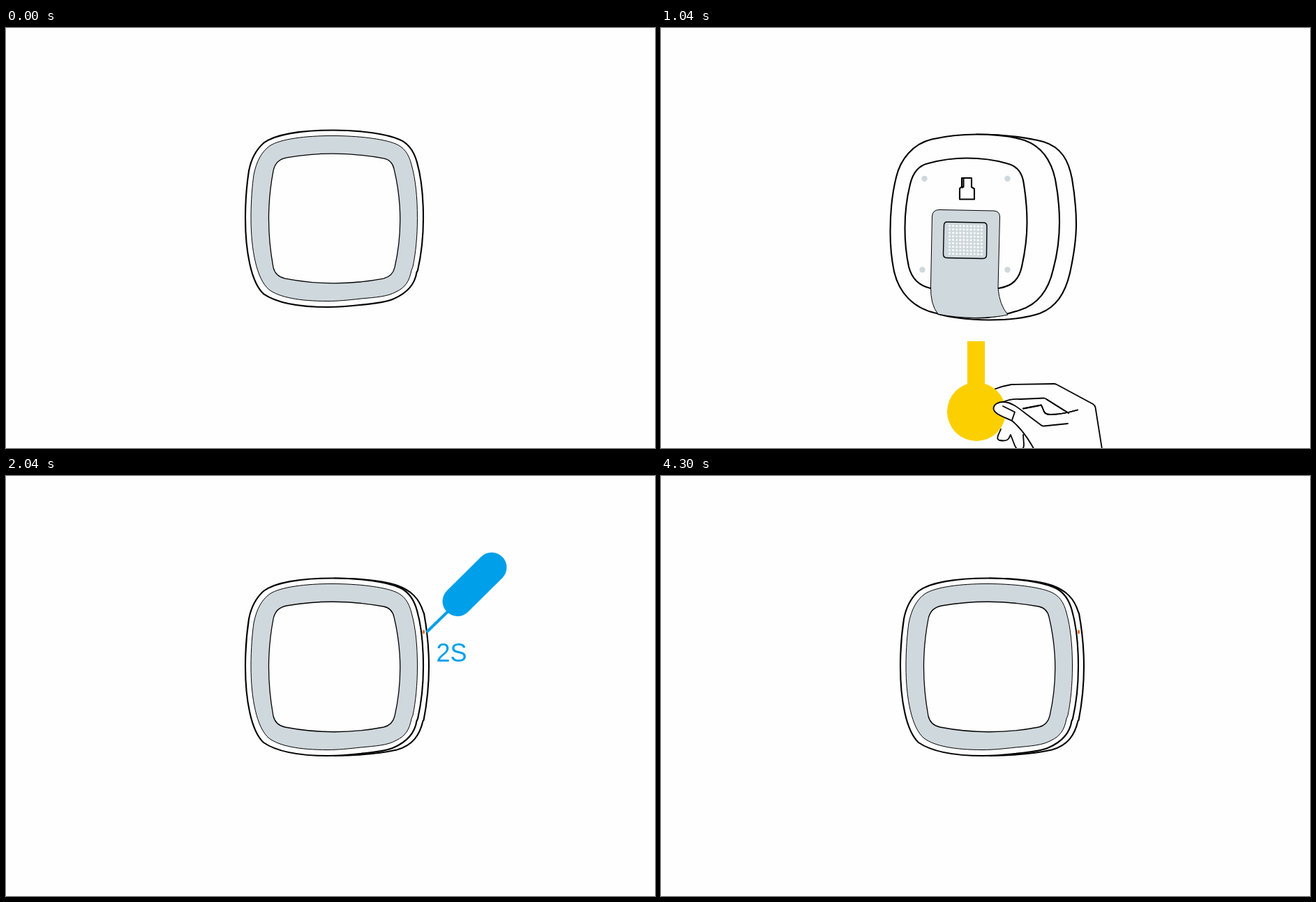
Recreate the animation shown at these times as an HTML page. Size 930 px wide and 602 px high, loop 4700 ms.

```html
<!DOCTYPE html>
<html lang="en">
<head>
<meta charset="utf-8">
<title>Device setup</title>
<style>
  html, body { margin: 0; width: 100%; height: 100%; overflow: hidden; background: #fefefe; }
  svg { display: block; width: 930px; height: 602px; }
  .line { fill: none; stroke: #000; stroke-width: 1.8; stroke-linecap: round; stroke-linejoin: round; }
  .body { fill: #fefefe; stroke: #000; stroke-width: 2.1; stroke-linejoin: round; }
  .grey { fill: #cfd8dd; }
  .thin { stroke: #000; stroke-width: 1; }
  .yellow { fill: #fcd000; }
  .blue { fill: #009fe9; }
  text { font: 36px "Liberation Sans", Arial, sans-serif; }
</style>
</head>
<body>
<svg viewBox="0 0 930 602">
  <defs>
    <radialGradient id="glow">
      <stop offset=".7" stop-color="#66dd1a"/>
      <stop offset="1" stop-color="#66dd1a" stop-opacity="0"/>
    </radialGradient>
  </defs>

  <g id="front">
    <g id="side">
      <path class="body" d="M470 146.5C510 147 544 151 561 157C580 164 592 175 598 195L599 197C603 219 606 243 606 273C606 302 603 327 598.5 350L597.5 351C593 371 583 386 560 392.5C535 398 506 400.500 470 401"/>
    </g>
    <path class="body" d="M343 273C343 240 346 218 348 205C351 189 358 175 369 165C386 152 425 146.500 469 146.500C510 146.500 546 152 564 160L568 162C578 168 585 178 589 193C595 214 598 240 598 273C598 301 595 326 590 348L588.500 351C586 368 574 381 556 389C545 394 530 396 507 398C490 400 476 401 461 401C415 401 385 393 369 382C351 365 343 320 343 273Z"/>
    <path class="grey thin" d="M351 273C351 247 353 225 355 211C359 190 367 177 378 169C393 159 430 154.500 467 154.500C505 154.500 541 159 558 166C570 171 577 180 581 196C587 217 589.500 243 589.500 273C589.500 299 587 324 583 343L581 348C578 364 572 373 559 379C547 386 530 387 508 389C490 391 476 392.500 461 392.500C420 392.500 392 387 377 376C359 361 351 318 351 273Z"/>
    <path class="body" style="stroke-width:1.3" d="M383 205Q386 189 402 186Q470 174 541 187Q553 189 556 202Q573 273 557 344Q554 357 541 360Q470 373.500 400 360Q386 357 383 344Q370 273 383 205Z"/>
    <ellipse id="button" cx="598.500" cy="223.500" rx="1.700" ry="3" fill="#e8742a"/>
    <g id="tool" stroke="#009fe9">
      <path d="M602.500 224L637 190.500" stroke-width="4"/>
      <path d="M696 131L647 179.500" stroke-width="43" stroke-linecap="round"/>
    </g>
    <text id="count" class="blue" x="616.500" y="266"></text>
    <circle id="light" cx="466.500" cy="381" r="9" fill="url(#glow)"/>
  </g>

  <g id="back">
    <rect width="930" height="602" fill="#fefefe"/>
    <g id="hand">
      <path class="line" d="M477 434Q490 429 502 427L563 426Q565 426 567 427L619 455Q622 457 622.500 460L640 570L652 645
        M490 452Q502 447 515 448L549 446.500Q551 447 553 448.500L584 468
        M519 461.500L545 456.500L549 466Q551 470 558 470Q574 470 597 463.500
        M487 491L483 500Q481 506 485 507Q497 509 499 503L501 499L506 512Q509 521 515 521Q520 520 520 513L519 499"/>
      <path class="yellow" d="M439 365h25v65h-25z"/>
      <circle class="yellow" cx="452" cy="466" r="42"/>
      <path fill="#fefefe" d="M490 452C502 452 513 461 523 469L546 486L583 483L594 580C569 577 557 565 545 538C530 511 520 493 503 479C493 474 476 469 476.500 461C477 455 484 452 490 452Z"/>
      <path class="line" d="M583 483L549 486.500Q546 487 543 484L523 469C513 461 502 452 490 452C484 452 477 455 476.500 461C476 469 493 474 503 479C520 493 530 511 545 538C555 566 570 579 594 580.500
        M545 538C544 570 544 573 552 580L574 603L600 632
        M490 458L507 466.500L503 478
        M519 461.500L545 456.500L549 466Q551 470 558 470Q574 470 597 463.500M553 448.500L584 468"/>
    </g>
    <path class="body" d="M452 152.500C490 152.500 525 157 548 163C574 171 584 190 589 216C593 240 595 260 595 281C595 304 591 328 586 351C579 381 566 400 543 409C520 417 495 418.500 470 418.500C440 418 415 415 397 410Z"/>
    <path class="body" d="M328.500 292C328.500 265 331 238 337 214C343 188 361 166 388 159.500C410 154.500 430 152.500 452 152.500C478 152.500 502 155 521 161C546 170 559 189 565 217C569 238 571 258 571 278C571 300 568 324 562 346C555 377 540 396 515 404C495 411 475 415.500 455 415.500C430 415 412 413 395 409C361 402 341 379 334 349C330 330 328.500 311 328.500 292Z"/>
    <path class="body" d="M349.500 287C349.500 265 353 240 357 224C361 207 369 197 383 194C401 189 420 186.500 438 186.500C458 186.500 478 189 495 194C512 198 518 209 520 224C523 243 524.500 260 524.500 279C524.500 302 521 324 517 342C513 360 504 370 484 373H386C368 369 359 358 355 342C351 323 349.500 305 349.500 287Z"/>
    <g class="grey">
      <circle cx="377.500" cy="216" r="4.200"/><circle cx="496.500" cy="216" r="4.200"/>
      <circle cx="374.500" cy="346.500" r="4.200"/><circle cx="496.500" cy="346.500" r="4.200"/>
    </g>
    <path class="body" d="M431 215H445V228L449 230.500V245.500H428V230L431 227.500ZM433.500 215V227.500L431 229"/>
    <path class="grey thin" d="M388.500 270Q389 260.500 399 260.500L476 262Q485.500 262 485.500 271L483 373Q485 397 497 411Q480 415 450 415.500Q420 415 397 410Q386 397 386.500 370Z"/>
    <path class="grey thin" style="stroke-width:1.400" d="M405.500 283Q405.500 278 410 278L462 279Q467 279 467 284L466.500 325Q466.500 330.500 461 330.500L410 329.500Q404.500 329.500 404.500 324Z"/>
    <g id="grid" fill="#fefefe"></g>
  </g>
</svg>
<script>
const LOOP = 4700;
const el = id => document.getElementById(id);
const [side, button, tool, count, light, front, back, hand, grid] =
  ['side', 'button', 'tool', 'count', 'light', 'front', 'back', 'hand', 'grid'].map(el);

for (let row = 0; row < 9; row++) {
  for (let col = 0; col < 10; col++) {
    const dot = document.createElementNS('http://www.w3.org/2000/svg', 'circle');
    dot.setAttribute('cx', 413.5 + col * 5.1);
    dot.setAttribute('cy', 283.5 + row * 5 + col * 0.08);
    dot.setAttribute('r', 1.5);
    grid.append(dot);
  }
}

// Number of discrete steps done, from 0 to n; the first falls on "from", the last on "to".
function steps(t, from, to, n) {
  const k = Math.floor((t - from) / (to - from) * (n - 1) + 1e-6) + 1;
  return Math.max(0, Math.min(n, k));
}
const show = (node, opacity) => { node.style.opacity = opacity; };

function draw(t) {
  const second = t >= 1380;
  const pulled = Math.max(0, steps(t, 530, 1040, 18) - 1) / 17;
  const away = 24 * (1 - steps(t, 1820, 2040, 8) / 8);

  show(front, second ? steps(t, 1520, 1790, 10) / 10 : t < 300 ? 1 : 0);
  front.setAttribute('transform', second ? '' : 'matrix(1 0 0 .996 0 .58)');
  show(side, second ? 1 : 0);
  show(button, second ? 1 : 0);
  show(back, second ? 0 : steps(t, 30, 300, 10) / 10 * (1 - steps(t, 1070, 1380, 10) / 10));
  hand.setAttribute('transform', `translate(0 ${84 * pulled})`);

  show(tool, second && t < 2980 ? 1 : 0);
  tool.setAttribute('transform', `translate(${away} ${-away})`);
  count.textContent = t < 2040 || t >= 2980 ? '' : t < 2510 ? '2S' : '1S';

  // Blink: full, off, full, off, full, off in five even ramps.
  const beat = Math.floor((t - 2980) / 30) * 30 / 264;
  const lit = t >= 2980 && t < 4300;
  show(light, lit ? Math.abs(1 - beat % 2) : 0);
}

const start = performance.now();
function tick() {
  draw((performance.now() - start) % LOOP);
  requestAnimationFrame(tick);
}
tick();
</script>
</body>
</html>
```
